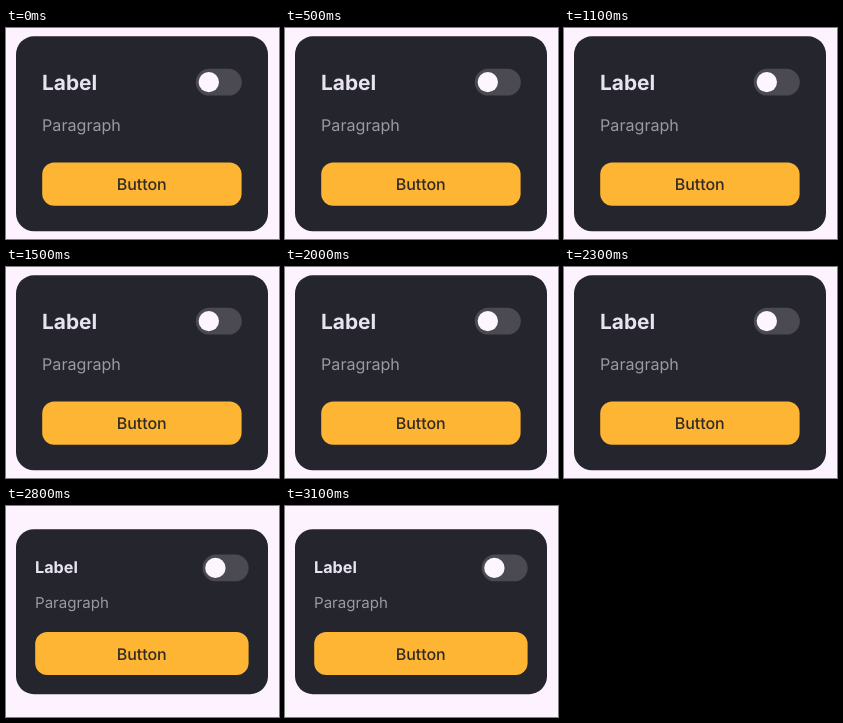
These frames come from a looping animation (273x211 px, 4900 ms). An HTML page:

```html
<!DOCTYPE html>
<html lang="en">
<head>
<meta charset="utf-8">
<title>Card spacing</title>
<style>
  html, body { margin: 0; width: 100%; height: 100%; overflow: hidden; background: #fdf3fe; }
  svg {
    display: block; width: 273px; height: 211px;
    font-family: Inter, sans-serif; text-rendering: geometricPrecision;
    filter: blur(0.4px); /* soft video-like edges */
  }
  .card { fill: #24252d; }
  .label { font-weight: 650; fill: #e8e3f1; }
  .paragraph { fill: #9c99a5; }
  .track { fill: #4b4a53; }
  .knob { fill: #fdf6ff; }
  .button { fill: #fdb533; }
  .caption { font-size: 16px; font-weight: 500; fill: #302a28; text-anchor: middle; }
</style>
</head>
<body>
<svg viewBox="0 0 273 211">
  <g id="loose">
    <rect class="card" x="10" y="8.3" width="252" height="195" rx="18"/>
    <text class="label" x="36" y="62.3" font-size="20.9">Label</text>
    <text class="paragraph" x="36.1" y="103.2" font-size="16.1">Paragraph</text>
    <rect class="track" x="189.8" y="40.8" width="46" height="26.8" rx="13.4"/>
    <circle class="knob" cx="202.8" cy="54.1" r="10.2"/>
    <rect class="button" x="36.2" y="134.4" width="199.4" height="43.3" rx="12"/>
    <text class="caption" x="135.7" y="162.2">Button</text>
  </g>
  <g id="compact">
    <rect class="card" x="10" y="23.2" width="252" height="165" rx="18"/>
    <text class="label" x="29" y="67.3" font-size="16.2">Label</text>
    <text class="paragraph" x="29" y="102" font-size="15.1">Paragraph</text>
    <rect class="track" x="196.6" y="48.5" width="46" height="26.8" rx="13.4"/>
    <circle class="knob" cx="209.4" cy="61.9" r="10.2"/>
    <rect class="button" x="29.2" y="126.1" width="213.4" height="43" rx="12"/>
    <text class="caption" x="135.7" y="153.7">Button</text>
  </g>
</svg>
<script>
  const LOOP = 4900, SWITCH = 2800;

  // Both layouts alternate with a hard cut.
  function cut(id, before, after) {
    document.getElementById(id).animate([
      { opacity: before, offset: 0, easing: 'step-end' },
      { opacity: after, offset: SWITCH / LOOP, easing: 'step-end' },
      { opacity: after, offset: 1 }
    ], { duration: LOOP, iterations: Infinity });
  }

  cut('loose', 1, 0);
  cut('compact', 0, 1);
</script>
</body>
</html>
```
